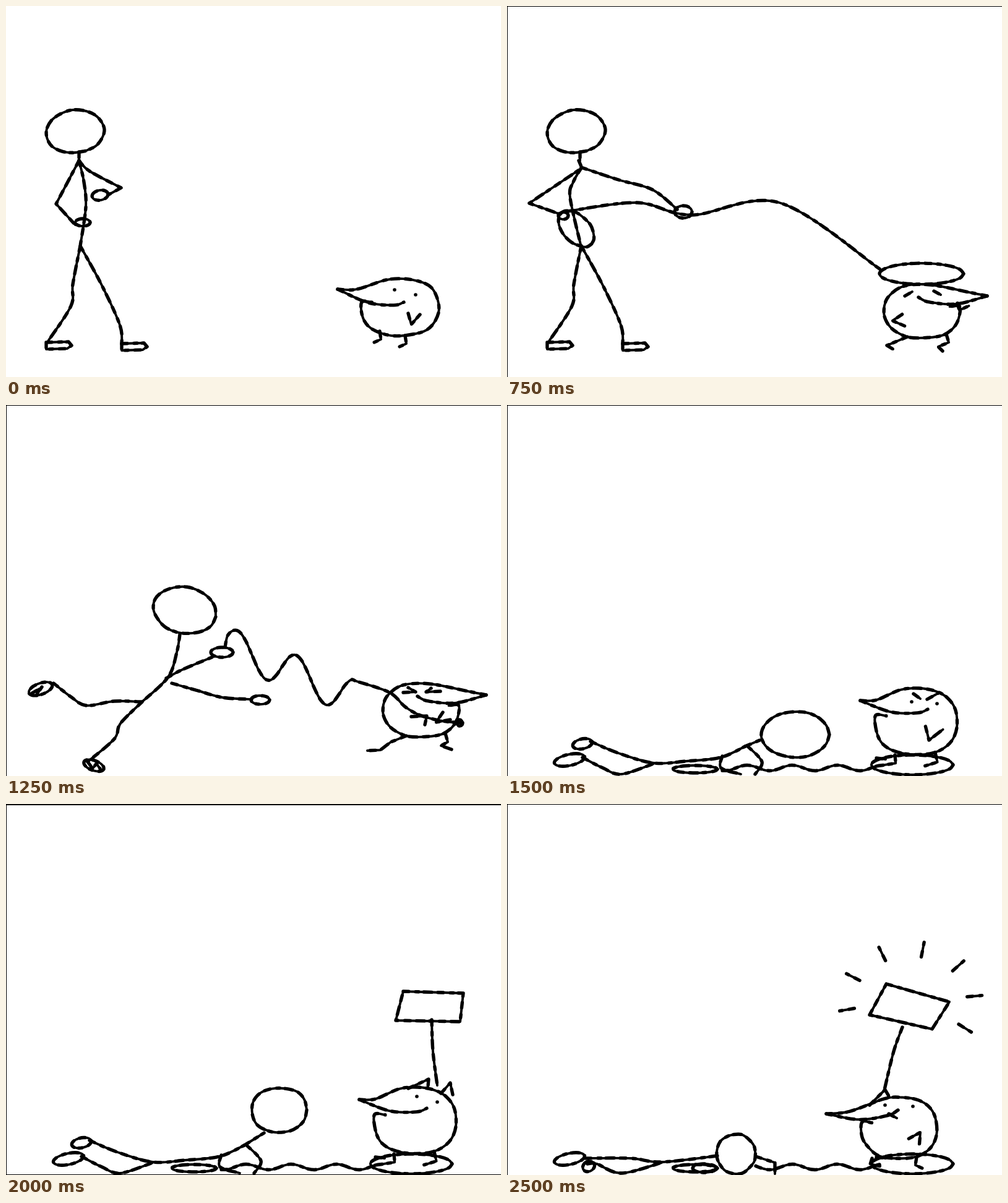
Write an HTML page that moves like this. It is 800 px wide and 600 px high and loops after 2.75 s.

```html
<!DOCTYPE html>
<html lang="en">
<head>
<meta charset="utf-8">
<title>Lasso</title>
<style>
html, body { margin: 0; width: 100%; height: 100%; overflow: hidden; background: #fff; }
svg { display: block; width: 100vw; height: 100vh; }
path { fill: none; stroke: #000; stroke-linecap: round; stroke-linejoin: round; }
.base { stroke-width: 3.9; }
.lump { stroke-width: 5.4; stroke-dasharray: 9 11 5 8 13 10; }
.thin { stroke-width: 1.4; }
.full { fill: #000; stroke-width: 4; }
</style>
</head>
<body>
<svg id="stage" viewBox="0 0 800 600"></svg>
<script>
const stage = document.getElementById('stage');
const STEP = 250;
const RAD = Math.PI / 180;

let seed = 7;
const wobble = () => (seed = seed * 16807 % 2147483647) / 2147483647 * 2 - 1;
const range = n => Array.from({ length: n }, (_, i) => i);
const points = text => text.trim().split(/\s+/).map(p => p.split(',').map(Number));
const mix = (a, b, t, drop = 0) => [a[0] + (b[0] - a[0]) * t, a[1] + (b[1] - a[1]) * t + drop];

// Pen strokes
function smooth(pts) {
  const at = i => pts[Math.max(0, Math.min(pts.length - 1, i))];
  return pts.slice(1).reduce((d, c, i) => {
    const [a, b, e] = [at(i - 1), at(i), at(i + 2)];
    const c1 = b.map((v, k) => v + (c[k] - a[k]) / 6);
    const c2 = c.map((v, k) => v - (e[k] - b[k]) / 6);
    return `${d}C${c1} ${c2} ${c}`;
  }, 'M' + pts[0]);
}
const brush = d => `<path class="base" d="${d}"/><path class="lump" d="${d}"/>`;
const ink = pts => brush(smooth(pts));
const poly = pts => brush('M' + pts.join('L'));
const limbs = text => text.split(';').map(s => ink(points(s))).join('');
const lines = text => text.split(';').map(s => poly(points(s))).join('');
const dots = text => points(text).map(([x, y]) => `<circle cx="${x}" cy="${y}" r="2.8"/>`).join('');

// Points of an oval; power below 1 makes it boxier
function oval(x, y, rx, ry, tilt = 0, from = 0, to = 360, power = 1) {
  const n = Math.ceil(Math.abs(to - from) / 24);
  const bend = v => Math.sign(v) * Math.abs(v) ** power;
  const [c, s] = [Math.cos(tilt * RAD), Math.sin(tilt * RAD)];
  return range(n + 1).map(i => {
    const a = (from + (to - from) * i / n) * RAD;
    const [u, v] = [rx * bend(Math.cos(a)), ry * bend(Math.sin(a))];
    const slip = Math.min(rx, ry) > 20 && i % n ? 0.8 : 0;
    return [x + u * c - v * s + slip * wobble(), y + u * s + v * c + slip * wobble()];
  });
}
const ring = (...args) => ink(oval(...args));

// A small shape turned and put in place
function place(shape, x, y, turn = 0, sx = 1, sy = 1) {
  const [c, s] = [Math.cos(turn * RAD), Math.sin(turn * RAD)];
  return poly(points(shape).map(([u, v]) => [x + u * sx * c - v * sy * s, y + u * sx * s + v * sy * c]));
}
const shoe = (...at) => place('0,0 36,-1 41,5 34,10 0,11 0,0', ...at);
const wing = (...at) => place('-5,-18 0,0 14,-16', ...at);
const claw = (...at) => place('0,0 2,13 -9,18', ...at);

// Short lines fanning out around a centre
function burst(x, y, rx, ry, length, from, turn, n) {
  return range(n).map(i => {
    const a = (from + turn * i) * RAD;
    const [u, v] = [Math.cos(a), Math.sin(a)];
    return poly([[x + rx * u, y + ry * v], [x + (rx + length) * u, y + (ry + length) * v]]);
  }).join('');
}
function dust(x, y, gap, length) {
  return range(3).map(i => {
    const a = (45 - 22 * i) * RAD;
    const p = [x + gap * i, y - 2.5 * i];
    return poly([p, [p[0] + length * Math.cos(a), p[1] + length * Math.sin(a)]]);
  }).join('');
}
const wave = (x0, x1, y0, slope, size, period, crest) => range(Math.ceil((x1 - x0) / 10)).map(i => {
  const x = x0 + 10 * i;
  return [x, y0 + slope * (x - x0) - size * Math.cos((x - crest) / period * 2 * Math.PI)];
});

// Standing man
const head = ring(111.5, 203, 47, 34.5, -7, 75, 435) + lines('118,236 118,250');
const legs = limbs('120,388 108,450 105,485 68,542; 120,388 155,452 184,516 187,547') + shoe(65, 544) + shoe(187, 546);
const idle = head + legs
  + limbs('118,250 126,285 129,325 120,388; 118,250 135,267 186,294')
  + lines('118,250 81,320 112,354; 186,294 166,305')
  + ring(124, 350, 12, 6) + ring(152, 306, 13, 8, -10);
const coil = lines('116,250 121,262 36,319 84,336') + ring(112, 360, 35, 22, 45) + ring(91, 339, 8, 6);
const swing = head + legs + coil
  + limbs('118,240 126,290 129,330 120,390; 120,261 165,275 212,289; 224,299 214,313 160,321 98,332')
  + ring(215, 294, 10, 4) + lines('226,292 245,295 245,287 228,285');
const reach = head + coil
  + limbs('120,262 107,285 102,310 120,390; 120,261 180,281 235,297 275,329') + ring(285, 333, 14, 10);
const braced = reach
  + limbs('120,390 85,412 41,459; 41,459 62,480 76,505; 120,390 150,440 205,523')
  + shoe(46, 509, 3) + shoe(202, 524, 11) + dust(57, 535, 15, 13) + dust(208, 549, 25, 19);

// Man in the air
const flying = ring(289, 332, 51, 37, 12)
  + limbs('281,371 276,400 262,440 220,480; 259,442 285,428 335,407; 268,450 310,462 350,473 397,476')
  + limbs('218,480 175,479 130,486 105,472 77,450; 220,480 185,515 175,540 132,577')
  + ring(349, 400, 18, 8) + ring(411, 477, 15, 7) + ring(56, 459, 20, 9, -20) + ring(142, 583, 17, 8, 20)
  + lines('42,466 54,459 50,468 58,456; 132,577 140,588 146,580 152,588');

// Man on the ground
const resting = ring(304, 589, 36, 6) + ring(101, 574, 25, 9, -12);
const prone = resting + ring(122, 548, 16, 8, -12)
  + limbs('135,544 180,563 237,579 290,576 345,570 385,552; 122,570 155,587 185,597 237,580')
  + limbs('348,568 346,587 378,597; 388,551 412,577 401,597');
const slack = from => ink(wave(from, 612, 587, 0, 4.5, 73, 388));
const fallen = prone + slack(348) + ring(466, 533, 55, 37) + lines('385,552 411,541');
const looking = prone + slack(348) + ring(442, 495, 44, 36, 0, 0, 360, 0.9) + lines('385,552 417,532');
const flat = resting + ring(370, 566, 31.5, 32) + slack(402) + ring(319, 589, 19, 7)
  + limbs('127,573 200,573 250,579 340,569; 130,582 145,582 185,597 250,580')
  + ring(132, 586, 10, 8, -30) + lines('402,570 433,580 433,598');

// Bird: boxy oval that runs out into a beak; face is -1 to look left
function bird({ x, y, rx, ry, tip, gape, face = -1 }) {
  const round = oval(0, 0, rx, ry, 0, -110, 188, 0.87).map(([u, v]) => [x - face * u, y + v]);
  const throat = [x + face * 0.73 * rx, y - 0.17 * ry];
  const brow = mix(tip, round[0], 0.4, face < 0 ? 6 : 0);
  return ink([tip, brow, ...round, throat])
    + ink([tip, mix(tip, gape, 0.45, 12), mix(tip, gape, 0.85, 8), gape]);
}
const calm = bird({ x: 637, y: 487, rx: 62.5, ry: 46, tip: [536, 458], gape: [643, 479] })
  + dots('628,459 662,467') + wing(655, 515);
const standing = calm + claw(604, 526) + claw(645, 533);
const stepping = calm + claw(604, 526, 20) + claw(645, 533, -10, 1, 1.4);
const turned = bird({ x: 671, y: 493.5, rx: 61, ry: 43.5, tip: [776, 469], gape: [665, 471], face: 1 });
const startled = turned + wing(623, 509, 72) + wing(731, 492, 10, 1, 0.6)
  + lines('643,469 655,462; 690,461 701,467; 647,535 614,549 624,555; 710,531 714,544 697,551 704,558');
const alarm = '<path class="full" d="M618,370H631L637,408H634Z"/>' + dots('642,424');
const caught = turned + ring(733, 514, 5, 5)
  + lines('642,465 662,464 650,457; 702,463 679,464 687,458; 655,504 680,503 677,517; 706,497 695,513 718,509')
  + lines('647,535 622,545 605,558 584,559; 710,531 714,545 703,551 720,557');
const shaking = range(3).map(i => {
  const [x, y] = [567 + 12 * i, 476 - 13 * (i % 2)];
  const [u, v] = [773 - 4 * (i % 2), 482 + 20 * i];
  return [[[x, y], [x - 2, y + 11], [x + 3, y + 23]], [[u, v], [u - 5, v + 9], [u - 24 - 6 * i, v + 12]]]
    .map(pts => `<path class="thin" d="${smooth(pts)}"/>`).join('');
}).join('');
const strain = shaking
  + burst(592, 559, 19, 19, 18, 150, 28, 3) + burst(713, 552, 15, 15, 14, 25, 64, 3);

const knot = points('620,465 645,488 670,502 705,511 737,514');
const taut = ink([...points('103,330 125,322 210,318 298,338 420,373 480,391 540,416 590,440'), ...knot])
  + burst(432, 376, 17, 17, 16, -90, 60, 6);
const loose = ink([[354, 392], ...wave(358, 575, 388, 0.42, 30, 95, 374), ...knot]);
const thrown = limbs('98,332 210,318 298,338 440,318 602,425') + ring(670, 433, 68, 17);
const spun = ring(163, 86, 125, 34, -8) + lines('152,132 150,127 162,124')
  + limbs('155,125 190,137 262,152 295,185 272,222 243,238 235,280');
const rising = ring(181, 107, 108, 30, -8)
  + limbs('176,138 240,166 264,205 238,250 232,281');

const heap = ring(655, 582, 66, 16) + lines('597,571 612,573');
const perched = { x: 661, y: 512, rx: 66, ry: 54, tip: [571, 478], gape: [680, 492] };
const sitting = heap + bird(perched) + claw(627, 566, 8, 1.5) + claw(692, 562, 0, 1.8, 1.2);
const cross = sitting + wing(682, 542, 5, 1.5, 1.2) + dots('654,480 695,483') + lines('657,467 668,475; 679,476 697,466');
const smug = sitting + dots('664,473 697,482') + lines('650,460 683,445 682,457; 703,468 718,451 722,470');
const sign = lines('642,303 739,306 734,352 630,350 642,303') + limbs('688,349 690,400 697,455');
const proud = heap + bird({ x: 634, y: 524, rx: 61, ry: 50, tip: [516, 501], gape: [632, 495] })
  + wing(668, 531, 200) + claw(590, 573, 0, -1.4, 0.7) + claw(662, 571, 0, -1) + dots('611,487 656,489')
  + lines('617,501 630,508; 586,487 611,462 618,474; 613,291 715,320 687,364 586,341 613,291')
  + limbs('639,361 625,400 610,462');
const rays = burst(652, 318, 92, 72, 24, -190, 37, 7);

const edge = (top, left, bottom = 0) => `<rect width="800" height="${top}"/>`
  + `<rect width="${left}" height="600"/><rect y="${600 - bottom}" width="800" height="${bottom}"/>`;

const scenes = [
  idle + standing,
  swing + rising + stepping,
  swing + spun + startled + alarm,
  reach + legs + thrown + startled + edge(1, 1),
  braced + taut + caught + strain + edge(1, 0),
  flying + loose + caught + edge(1, 1),
  fallen + cross + edge(1, 1),
  looking + smug + edge(2, 1, 1),
  looking + smug + sign + edge(2, 1, 1),
  flat + proud + edge(1, 1),
  flat + proud + rays + edge(1, 1)
];

let shown = -1;
function render(ms) {
  const i = Math.floor(ms / STEP) % scenes.length;
  if (i !== shown) stage.innerHTML = scenes[shown = i];
}

const start = performance.now();
function tick() {
  render(performance.now() - start);
  requestAnimationFrame(tick);
}
tick();
</script>
</body>
</html>
```
